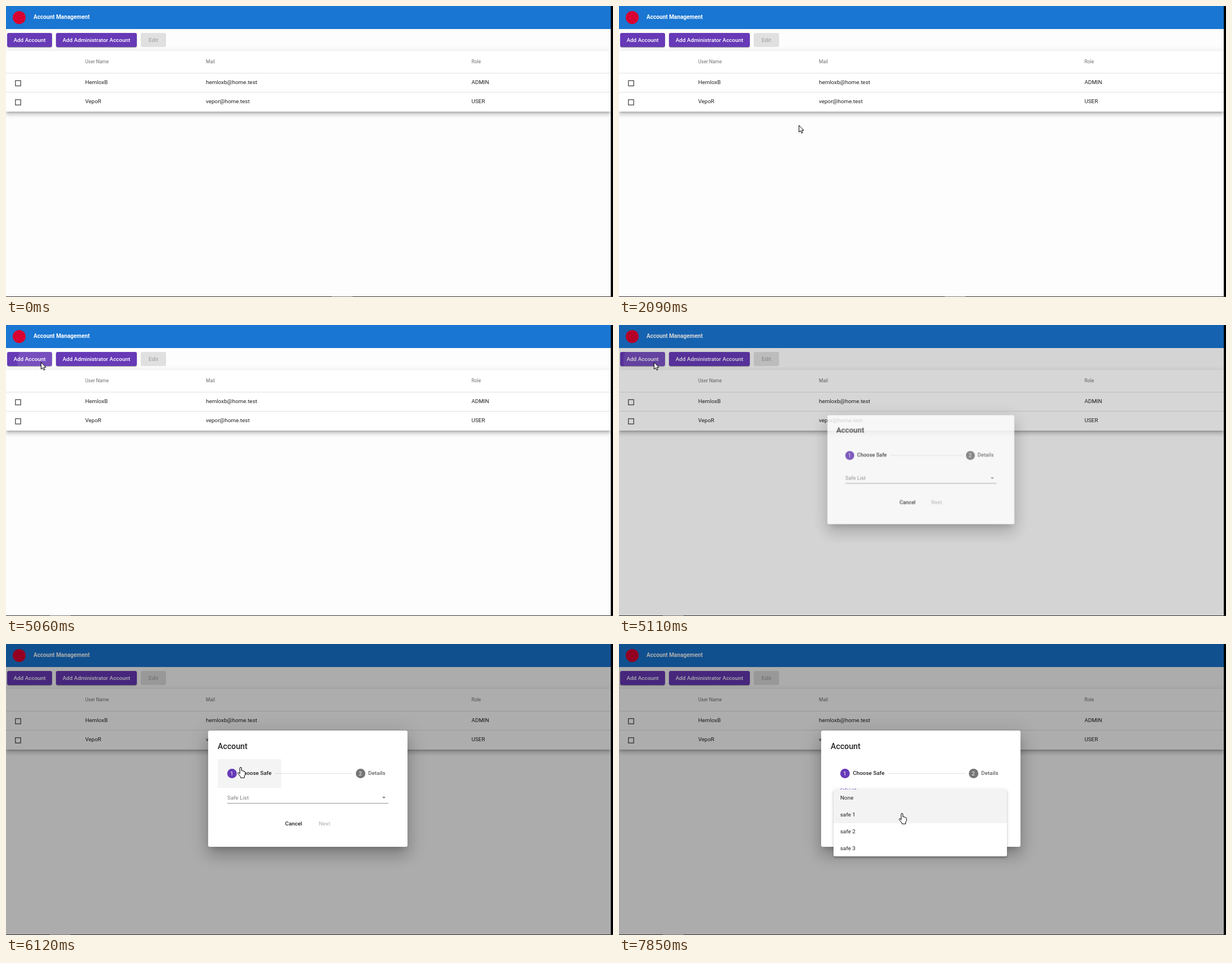
Recreate the animation shown at these times as an HTML page. Size 1081 by 518 pixels, loop 8 s.

```html
<!DOCTYPE html>
<html lang="en">
<head>
<meta charset="utf-8">
<title>Account Management</title>
<style>
html, body { margin: 0; width: 100%; height: 100%; overflow: hidden; background: #fdfdfd; }
#stage {
  position: relative; width: 1081px; height: 518px; overflow: hidden;
  font: 9.92px/20px Roboto, sans-serif; color: rgba(0,0,0,.87);
}
#stage * { position: absolute; box-sizing: border-box; animation-duration: 8s; animation-iteration-count: infinite; animation-timing-function: linear; }
#stage .t { margin-top: -10px; white-space: nowrap; }
#stage b { font-weight: 500; }
.head { font-size: 8.5px; color: rgba(0,0,0,.56); }

/* page */
.bar { left: 0; top: 0; width: 1077px; height: 41px; background: #1976d2; color: #fff; }
.logo { left: 12px; top: 8.5px; width: 23px; height: 23px; border-radius: 50%; background: #d80030; }
.btn { top: 48px; height: 25px; line-height: 25px; border-radius: 3px; text-align: center; font-weight: 500; }
.main { background: #673ab7; color: #fff; box-shadow: 0 2px 1px -1px rgba(0,0,0,.2), 0 1px 1px rgba(0,0,0,.14), 0 1px 3px rgba(0,0,0,.12); }
.off { background: #e0e0e0; color: #a8a8a8; }
.btn span { inset: 0; }
.clip { overflow: hidden; border-radius: 3px; }
.table {
  left: 0; top: 80px; width: 1077px; height: 107.5px; background: #fff;
  box-shadow: 0 3.5px 3.5px -2px rgba(0,0,0,.2), 0 5.7px 7px .7px rgba(0,0,0,.14), 0 2px 10px 1.4px rgba(0,0,0,.12);
}
.rule { height: 1px; background: rgba(0,0,0,.12); }
.check { left: 16px; width: 11px; height: 11px; border-radius: 1px; box-shadow: inset 0 0 0 1.5px #5e5e5e; }
.edge { left: 1077px; top: 0; width: 4px; height: 518px; background: #000; }
.foot { left: 0; top: 517px; width: 1081px; height: 1px; background: #2c2c2c; }
.foot i { left: 580px; top: 0; width: 37px; height: 1px; background: #7a7a7a; animation-name: tab; }

/* overlay */
#stage .shade { left: 0; top: 0; width: 1077px; height: 517px; background: rgba(0,0,0,.32); animation-name: shade; animation-timing-function: step-end; }
.wave { left: -3px; top: -45px; width: 126px; height: 126px; border-radius: 50%; background: #fff; animation-name: wave; }
#stage .dialog {
  left: 360px; top: 154px; width: 355px; height: 207px; border-radius: 3px; background: #fff;
  box-shadow: 0 8px 11px -5px rgba(0,0,0,.2), 0 17px 27px 2px rgba(0,0,0,.14), 0 6px 33px 6px rgba(0,0,0,.12);
  animation-name: dialog; animation-timing-function: step-end;
}
.hover { left: 17px; top: 51px; width: 113px; height: 51px; background: #f4f4f4; animation-name: step; }
.dot { top: 67.5px; width: 17px; height: 17px; line-height: 17px; border-radius: 50%; text-align: center; color: #fff; }
.label { left: 34px; top: 119.5px; color: rgba(0,0,0,.5); transform-origin: 0 50%; animation-name: label; }
.tri { left: 309.5px; top: 117.5px; border: solid transparent; border-width: 3.6px 3.6px 0; border-top-color: rgba(0,0,0,.54); }
.panel {
  left: 382px; top: 259px; width: 309px; height: 119px; border-radius: 3px; overflow: hidden; background: #fff;
  box-shadow: 0 1.4px 2.8px -.7px rgba(0,0,0,.2), 0 3px 3.5px rgba(0,0,0,.14), 0 .7px 7px rgba(0,0,0,.12);
  transform-origin: 50% 15px; animation-name: panel;
}
.row { left: 0; width: 100%; height: 30px; background: #f3f3f3; }
.pick { top: 30px; animation-name: pick; }

/* pointer */
#stage .ptr { left: 0; top: 0; animation-name: move; animation-timing-function: step-end; }
.ptr svg { overflow: visible; fill: #fff; stroke: #000; stroke-linejoin: round; }
.arrow { left: 0; top: 0; animation-name: arrow; }
.hand { left: -6px; top: 0; animation-name: hand; }

@keyframes tab { 0%, 60.24% { left: 580px } 60.25%, 100% { left: 78px } }
@keyframes shade {
  0% { opacity: 0 }
  63.875% { opacity: .5 }
  64.875% { opacity: .83 }
  66% { opacity: .96 }
  67%, 100% { opacity: 1 }
}
@keyframes wave {
  0%, 62.375% { transform: scale(0); opacity: .11; animation-timing-function: cubic-bezier(0,0,.2,1) }
  65.19% { transform: none; opacity: .11 }
  70%, 100% { transform: none; opacity: 0 }
}
@keyframes dialog {
  0% { transform: scale(.7); opacity: 0 }
  63.875% { transform: scale(.938); opacity: .8 }
  64.875% { transform: scale(.998); opacity: 1 }
  66%, 100% { transform: none; opacity: 1 }
}
@keyframes step { 0%, 76.49% { opacity: 0 } 76.5%, 80.49% { opacity: 1 } 80.5%, 100% { opacity: 0 } }
@keyframes label {
  0%, 87.5% { transform: none; color: rgba(0,0,0,.5); animation-timing-function: cubic-bezier(.25,.8,.25,1) }
  92.5%, 100% { transform: translateY(-14.5px) scale(.75); color: #673ab7 }
}
@keyframes panel {
  0%, 87.6% { transform: scale(.93,.8); opacity: 0; animation-timing-function: cubic-bezier(0,0,.2,1) }
  89.1%, 100% { transform: none; opacity: 1 }
}
@keyframes pick { 0%, 94.12% { opacity: 0 } 94.125%, 100% { opacity: 1 } }
@keyframes hand {
  0%, 38.6% { opacity: 0 } 38.61%, 63.06% { opacity: 1 }
  63.07%, 76.49% { opacity: 0 } 76.5%, 100% { opacity: 1 }
}
@keyframes arrow {
  0%, 38.6% { opacity: 1 } 38.61%, 63.06% { opacity: 0 }
  63.07%, 76.49% { opacity: 1 } 76.5%, 100% { opacity: 0 }
}
@keyframes move {
  0% { transform: translate(985px,520px) }
  4.875% { transform: translate(972px,506px) }
  5.8125% { transform: translate(972px,506px); animation-timing-function: steps(4,start) }
  9.5625% { transform: translate(870px,441px) }
  12.5% { transform: translate(870px,441px); animation-timing-function: steps(4,start) }
  16.5% { transform: translate(647px,363px) }
  19.375% { transform: translate(647px,363px); animation-timing-function: steps(4,start) }
  23.25% { transform: translate(379px,225px) }
  26.125% { transform: translate(320px,212px) }
  27% { transform: translate(320px,212px); animation-timing-function: steps(3,start) }
  30.125% { transform: translate(106px,99px) }
  33.125% { transform: translate(106px,99px); animation-timing-function: steps(8,start) }
  40.5% { transform: translate(62px,68px) }
  41.75% { transform: translate(62px,67px) }
  43.625% { transform: translate(62px,66px) }
  70.75% { transform: translate(62px,66px); animation-timing-function: steps(4,start) }
  74.5% { transform: translate(289px,139px) }
  76.5% { transform: translate(418px,219px) }
  77.5% { transform: translate(418px,219px); animation-timing-function: steps(4,start) }
  81.5% { transform: translate(492px,272px) }
  82.5% { transform: translate(492px,272px); animation-timing-function: steps(5,start) }
  87.5% { transform: translate(503px,283px) }
  93.125% { transform: translate(503px,283px); animation-timing-function: steps(5,start) }
  98.125%, 100% { transform: translate(504px,301px) }
}
</style>
</head>
<body>
<div id="stage">
  <div class="bar">
    <div class="logo"></div>
    <span class="t" style="left:49px;top:20px;font-size:10.1px;font-weight:700">Account Management</span>
  </div>
  <div class="table">
    <div class="rule" style="left:0;top:39px;width:1077px"></div>
    <div class="rule" style="left:0;top:73px;width:1077px"></div>
  </div>
  <div class="btn main" style="left:2px;width:80px">
    <span>Add Account</span>
    <span class="clip"><i class="wave"></i></span>
  </div>
  <div class="btn main" style="left:89px;width:144px"><span>Add Administrator Account</span></div>
  <div class="btn off" style="left:240px;width:45px"><span>Edit</span></div>

  <span class="t head" style="left:141px;top:99px">User Name</span>
  <span class="t head" style="left:356px;top:99px">Mail</span>
  <span class="t head" style="left:829px;top:99px">Role</span>
  <div class="check" style="top:132px"></div>
  <span class="t" style="left:141px;top:136px">HemloxB</span>
  <span class="t" style="left:356px;top:136px">hemloxb@home.test</span>
  <span class="t" style="left:829px;top:136px">ADMIN</span>
  <div class="check" style="top:166px"></div>
  <span class="t" style="left:141px;top:170px">VepoR</span>
  <span class="t" style="left:356px;top:170px">vepor@home.test</span>
  <span class="t" style="left:829px;top:170px">USER</span>

  <div class="shade"></div>

  <div class="dialog">
    <div class="hover"></div>
    <b class="t" style="left:17px;top:28px;font-size:14.2px">Account</b>
    <div class="dot" style="left:33.5px;background:#673ab7">1</div>
    <b class="t" style="left:56.5px;top:75.5px">Choose Safe</b>
    <div class="rule" style="left:119px;top:76px;width:138px"></div>
    <div class="dot" style="left:262.5px;background:#757575">2</div>
    <b class="t" style="left:285px;top:75.5px;color:rgba(0,0,0,.62)">Details</b>
    <span class="t label">Safe List</span>
    <div class="tri"></div>
    <div class="rule" style="left:34px;top:129px;width:287px;background:#949494"></div>
    <b class="t" style="left:137px;top:166px">Cancel</b>
    <b class="t" style="left:197px;top:166px;color:rgba(0,0,0,.26)">Next</b>
  </div>

  <div class="panel">
    <div class="row" style="top:0"></div>
    <div class="row pick"></div>
    <span class="t" style="left:12px;top:14.5px">None</span>
    <span class="t" style="left:12px;top:44.5px">safe 1</span>
    <span class="t" style="left:12px;top:74.5px">safe 2</span>
    <span class="t" style="left:12px;top:104.5px">safe 3</span>
  </div>

  <div class="ptr">
    <svg class="arrow" width="10" height="16"><path d="M.5 .5V12.6L3.3 10L5.2 14.4L7.2 13.5L5.4 9.3H9Z"/></svg>
    <svg class="hand" width="15" height="20"><path d="M4.5 12V2a1.5 1.5 0 0 1 3 0V6.8C8 5.8 9.8 6 9.8 7.4C10.5 6.6 12 7 12 8.3C12.8 7.6 14 8.2 14 9.5V13.5L12.5 16V19.2H5.8V17.5L1.2 11.8C.3 10 1.8 9 2.8 10Z"/></svg>
  </div>

  <div class="edge"></div>
  <div class="foot"><i></i></div>
</div>
</body>
</html>
```
